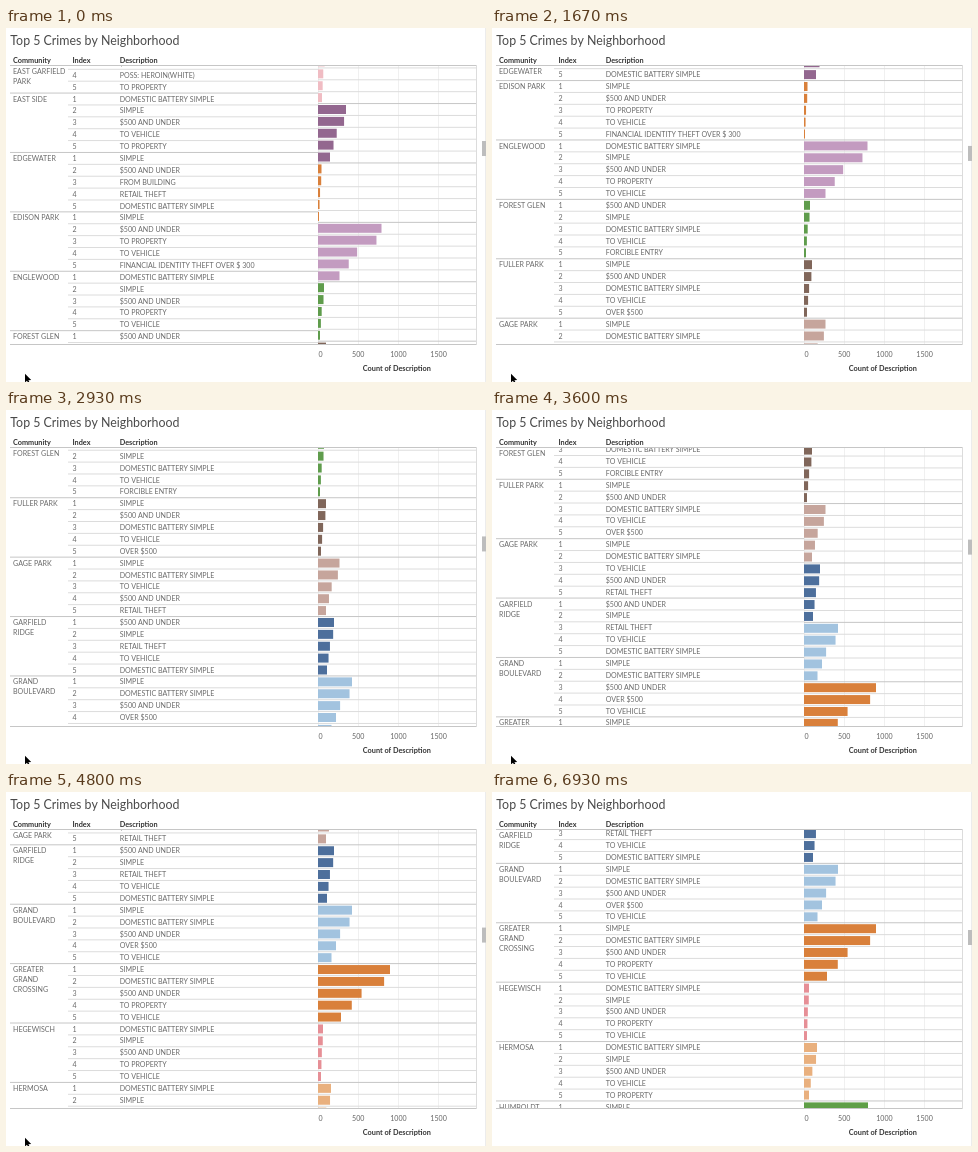
Write an HTML page with a canvas that moves like this. It is 480x354 px and loops after 6.99 s.

```html
<!DOCTYPE html>
<html lang="en">
<head>
<meta charset="utf-8">
<title>Top 5 Crimes by Neighborhood</title>
<style>
html, body { margin: 0; width: 100%; height: 100%; overflow: hidden; background: #fff; }
canvas { display: block; width: 480px; height: 354px; }
</style>
</head>
<body>
<canvas width="480" height="354"></canvas>
<script>
const ctx = document.querySelector('canvas').getContext('2d');
const LOOP = 6990, STEP = 1000 / 15, ROW = 11.88;
const TOP = 37, BOTTOM = 317, LEFT = 4, RIGHT = 470, BAR_X = 312;

const crimes = {
  d: 'DOMESTIC BATTERY SIMPLE', s: 'SIMPLE', $: '$500 AND UNDER', v: 'TO VEHICLE',
  p: 'TO PROPERTY', b: 'FROM BUILDING', r: 'RETAIL THEFT', o: 'OVER $500',
  e: 'FORCIBLE ENTRY', h: 'POSS: HEROIN(WHITE)', f: 'FINANCIAL IDENTITY THEFT OVER $ 300'
};

// label, bar colour, crime keys, longest and shortest bar
const groups = [
  ['EAST GARFIELD|PARK', '#5a9bd0', 'sd$hp', 30, 14],
  ['EAST SIDE', '#f0bcc3', 'ds$vp', 7, 4],
  ['EDGEWATER', '#93678f', 's$brd', 28, 12],
  ['EDISON PARK', '#d9803b', 's$pvf', 3.5, 1],
  ['ENGLEWOOD', '#c39bc0', 'ds$pv', 63.5, 21.5],
  ['FOREST GLEN', '#5f9c4c', '$sdve', 6, 2],
  ['FULLER PARK', '#80665a', 's$dvo', 8, 3],
  ['GAGE PARK', '#c6a59c', 'sdv$r', 21.5, 8],
  ['GARFIELD|RIDGE', '#4d6f9c', '$srvd', 16, 9],
  ['GRAND|BOULEVARD', '#a2c3df', 'sd$ov', 34, 13.5],
  ['GREATER|GRAND|CROSSING', '#d9803b', 'sd$pv', 72, 23],
  ['HEGEWISCH', '#e68f96', 'ds$pv', 5, 3],
  ['HERMOSA', '#e9b07e', 'ds$vp', 13, 5],
  ['HUMBOLDT|PARK', '#5f9f47', 'sd$vp', 64, 30]
];
// Typical drop from the longest bar to the shortest
const falloff = [1, 0.88, 0.42, 0.22, 0];

// Scroll gestures: start and end in ms, final y of the first row, ease-out power
const START_Y = 11.6, STALE = 200;
const glides = [
  [-150, 0, -37.3, 1],
  [400, 1270, -119.7, 2],
  [1670, 3270, -281.2, 1.4],
  [3400, 3600, -316.3, 1],
  [3600, 5070, -420.2, 1.96],
  [6000, 6600, -457.3, 2]
];

// The row headers hold still while a gesture begins, then catch up with the bars
function scrollAt(t) {
  const i = glides.findLastIndex(g => g[0] < t);
  const [start, end, to, power] = glides[i];
  const from = i ? glides[i - 1][2] : START_Y;
  const left = Math.max(0, (end - t) / (end - start));
  const bars = to + (from - to) * left ** power;
  return { bars, rows: t - start <= STALE ? from : bars };
}

function text(str, x, y, color = '#6a6a6a', font = '7.1px', align = 'left') {
  ctx.font = font + ' Lato, sans-serif';
  ctx.fillStyle = color;
  ctx.textAlign = align;
  ctx.fillText(str, x, y);
}

function box(x, y, w, h, color) {
  ctx.fillStyle = color;
  ctx.fillRect(x, y, w, h);
}

function clip(y, bottom, draw) {
  ctx.save();
  ctx.beginPath();
  ctx.rect(0, y, 480, bottom - y);
  ctx.clip();
  draw();
  ctx.restore();
}

function rule(x, right, y, strong) {
  box(x, y - 0.5, right - x, 1, strong ? '#c6c6c6' : '#dcdcdc');
}

function drawBars(y0) {
  groups.forEach(([, color, , max, min], g) => falloff.forEach((f, i) => {
    const y = y0 + (g * 5 + i) * ROW;
    rule(BAR_X, RIGHT, y - ROW / 2, !i);
    box(BAR_X, y - 4.5, min + (max - min) * f, 9, color);
  }));
}

function drawRows(y0) {
  groups.forEach(([label, , keys], g) => {
    const first = y0 + g * 5 * ROW, edge = first - ROW / 2;
    [...keys].forEach((key, i) => {
      const y = first + i * ROW;
      rule(i ? 62 : LEFT, BAR_X, y - ROW / 2, !i);
      text(i + 1, 66.5, y + 2.6);
      text(crimes[key], 113.7, y + 2.6);
    });
    // The label sticks to the top while its group is in view
    clip(Math.max(edge, TOP), Math.min(edge + 5 * ROW, BOTTOM), () =>
      label.split('|').forEach((part, i) =>
        text(part, 7, Math.max(first, 43) + i * 10 + 2.6)));
  });
}

function drawCursor(y) {
  ctx.beginPath();
  [[19, 0], [19, 8.6], [21, 6.9], [22.4, 9.8], [23.8, 9.1], [22.4, 6.4], [25.2, 6.2]]
    .forEach(([x, dy]) => ctx.lineTo(x, y + dy));
  ctx.closePath();
  ctx.fillStyle = '#000';
  ctx.fill();
}

function draw(now) {
  const frame = Math.floor((now % LOOP + 4) / STEP);
  const t = Math.round(frame * STEP / 10) * 10;
  const { bars, rows } = scrollAt(t);

  box(0, 0, 480, 354, '#fff');
  text('Top 5 Crimes by Neighborhood', 4.3, 17, '#4a4a4a', '12.4px');
  const bold = 'bold 7.3px';
  text('Community', 7, 35, '#333', bold);
  text('Index', 66.5, 35, '#333', bold);
  text('Description', 113.7, 35, '#333', bold);

  clip(TOP, BOTTOM, () => {
    for (let x = 0; x <= 120; x += 40) box(BAR_X + x, TOP, 1, 280, '#f0f0f0');
    drawRows(rows);
    drawBars(bars);
  });
  rule(LEFT, RIGHT, 37.5, true);
  rule(LEFT, RIGHT, 316.5, true);
  box(RIGHT, TOP, 1, 280, '#dcdcdc');

  for (let i = 0; i < 4; i++)
    text(i * 500, i ? BAR_X + i * 40.2 : 314.5, 328.6, '#666', '7.1px', 'center');
  text('Count of Description', 390.8, 343, '#333', bold, 'center');

  box(479, 0, 1, 354, '#ececec');
  box(476, 113 - (bars + 37) * 0.0595, 4, 15, '#bdbdbd');
  if (t < 6930) drawCursor(t < 6870 ? 345.8 : 350);
}

const start = performance.now();
function tick() {
  draw(performance.now() - start);
  requestAnimationFrame(tick);
}
tick();
</script>
</body>
</html>
```
